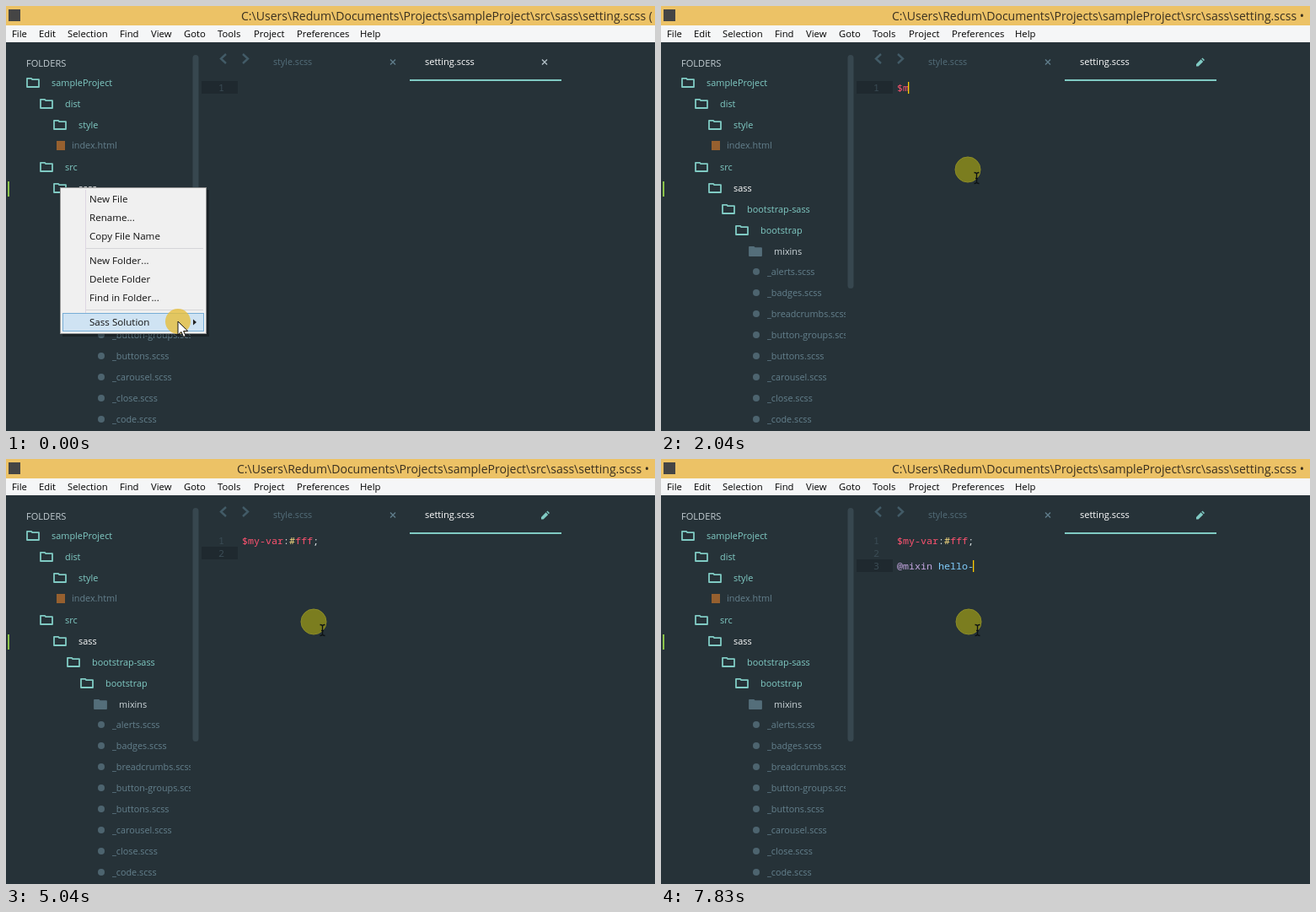
Write an HTML page that moves like this. It is 770 px wide and 504 px high and loops after 8000 ms.

```html
<!DOCTYPE html>
<html lang="en">
<head>
<meta charset="utf-8">
<title>Editor</title>
<style>
html, body { margin: 0; width: 100%; height: 100%; overflow: hidden; background: #263238; }
svg { display: block; width: 770px; height: 504px; font-family: "Open Sans", "Noto Sans", sans-serif; }
text { white-space: pre; }
.code { font: 11.67px "Noto Sans Mono", "DejaVu Sans Mono", monospace; }
</style>
</head>
<body>
<svg id="stage" viewBox="0 0 770 504">
  <clipPath id="side"><rect y="43" width="219" height="461"/></clipPath>
</svg>
<script>
const LOOP = 8000;
const TEAL = '#80cbc4', GREY = '#64808d', DIM = '#425b67';
const stage = document.getElementById('stage');

function add(tag, attrs, parent = stage, content = '') {
  const node = document.createElementNS('http://www.w3.org/2000/svg', tag);
  for (const k in attrs) node.setAttribute(k, attrs[k]);
  node.textContent = content;
  parent.append(node);
  return node;
}
const rect = (x, y, width, height, fill, parent, more) =>
  add('rect', { x, y, width, height, fill, ...more }, parent);
const label = (x, y, str, size, fill, parent) =>
  add('text', { x, y, 'font-size': size, fill }, parent, str);
const line = (d, stroke, width, parent) =>
  add('path', { d, stroke, 'stroke-width': width, fill: 'none' }, parent);
const show = (node, on) => node.setAttribute('display', on ? 'inline' : 'none');

// Window frame
rect(0, 0, 770, 23, '#ecc266');
rect(0, 23, 770, 20, '#f5f6f7');
rect(3, 4, 14, 14, '#454545');
const title = label(279, 17, '', 14.05, '#3a3020');
const bar = { File: 7, Edit: 39, Selection: 73, Find: 135, View: 172, Goto: 211,
  Tools: 251, Project: 294, Preferences: 345, Help: 420 };
for (const name in bar) label(bar[name], 37, name, 11.3, '#000');

// Sidebar
const side = add('g', { 'clip-path': 'url(#side)' });
label(24, 72, 'FOLDERS', 11.1, '#c3cdd2', side);
const folders = [['sampleProject', 0, 91], ['dist', 1, 116], ['style', 2, 141], ['src', 1, 191],
  ['sass', 2, 216], ['bootstrap-sass', 3, 241], ['bootstrap', 4, 266], ['mixins', 5, 291]];
for (const [name, depth, y] of folders) {
  const x = 24 + 16 * depth, closed = name === 'mixins';
  add('path', {
    d: `M${x + 1} ${y - 5.2}h5l1.2 1.4h7.8v8.8h-14z`, 'stroke-width': 1.8, 'stroke-linejoin': 'round',
    fill: closed ? '#546e7a' : 'none', stroke: closed ? '#546e7a' : TEAL
  }, side);
  label(x + 30, y + 4, name, 10.9, closed ? '#cfd8dc' : name === 'sass' ? '#fff' : TEAL, side);
}
rect(60, 160, 10, 11, '#96602f', side);
label(78, 169, 'index.html', 10.85, GREY, side);
['alerts', 'badges', 'breadcrumbs', 'button-groups', 'buttons', 'carousel', 'close', 'code']
  .forEach((name, i) => {
    const y = 315 + 25 * i;
    add('circle', { cx: 113, cy: y, r: 4, fill: '#4d646f' }, side);
    label(126, y + 4, `_${name}.scss`, 10.8, GREY, side);
  });
rect(2, 208, 2, 18, '#8bc34a');
rect(221.5, 58, 7, 277, '#37474f', stage, { rx: 3.5 });

// Tabs
line('M261 57l-6 5.5 6 5.5M281 57l6 5.5-6 5.5', DIM, 2.4);
label(317, 70, 'style.scss', 10.7, '#546e7a');
label(497, 70, 'setting.scss', 11, '#fff');
const cross = x => `M${x - 3} 63.5l6 6m0-6l-6 6`;
line(cross(459), '#607d8b', 1.4);
const close = line(cross(639), '#b0bec5', 1.4);
const pencil = add('path', { d: 'M635 71.5v-2.6l5.6-5.6 2.6 2.6-5.6 5.6zM641.3 62.6l1.2-1.1 2.5 2.5-1.1 1.2z', fill: TEAL });
rect(479, 87, 180, 2, TEAL);

// Editor
const gutter = rect(232, 89, 43, 15, '#1f292f');
const rows = [0, 1, 2].map(i => ({
  num: add('text', { x: 252, y: 101 + 15 * i, class: 'code', fill: '#3b4c55' }, stage, i + 1),
  code: add('text', { x: 280, y: 101 + 15 * i, class: 'code' })
}));
const caret = rect(279, 90, 1.3, 14, '#ffcc00');

// Context menus
function popup(x, y, w, h, items, gap) {
  const g = add('g', {});
  rect(x + 3, y + 3, w, h, '#000', g, { opacity: .3 });
  rect(x + .5, y + .5, w - 1, h - 1, '#f0f0f0', g, { stroke: '#979797' });
  line(`M${x + 30.5} ${y + 3}v${h - 6}`, '#ddd6e2', 1, g);
  for (const [name, dy, hot] of items) {
    if (hot) rect(x + 3.5, y + dy - 10.5, w - 7, 21, '#cfe3f3', g, { stroke: '#78aed6' });
    if (name) label(x + gap, y + dy + 4, name, 11.6, '#111', g);
    else line(`M${x + 31} ${y + dy - .5}h${w - 35}`, '#d5d5d8', 1, g);
  }
  return g;
}
const menu = popup(64, 215, 174, 174, [['New File', 14], ['Rename...', 36], ['Copy File Name', 58], ['', 73],
  ['New Folder...', 87], ['Delete Folder', 109], ['Find in Folder...', 131], ['', 146],
  ['Sass Solution', 160, true]], 35);
add('path', { d: 'M222 371.5l4 3.5-4 3.5z', fill: '#222' }, menu);
const submenu = popup(232, 361, 245, 72, [['Add To AutoComplete', 14, true],
  ['Remove From AutoComplete', 36], ['Clear AutoComplete', 58]], 35);

// Pointer
const pointer = add('g', {});
const halo = add('circle', { r: 15 }, pointer);
const arrow = add('path', { d: 'M0 0v16l4-3.6 2.6 6 2.6-1.1-2.6-5.8h5.2z', fill: '#fff', stroke: '#111' }, pointer);
const beam = line('M7.5 3.5q3 0 3 2v9q0 2-3 2M13.5 3.5q-3 0-3 2v9q0 2 3 2M9 10.5h3', '#0c1114', 1.3, pointer);

const SUB_OPEN = 300, MENU_CLOSE = 860;
const path = [[0, 204, 374], [60, 204, 374], [320, 232, 374], [430, 232, 374], [760, 330, 377],
  [860, 332, 376], [1090, 364, 194], [4450, 364, 194], [4510, 365, 193], [LOOP, 365, 193]];

function pointerAt(t) {
  const i = path.findIndex(p => p[0] > t);
  const [t0, x0, y0] = path[i - 1], [t1, x1, y1] = path[i];
  const u = (t - t0) / (t1 - t0), e = u * u * (3 - 2 * u);
  return [x0 + (x1 - x0) * e, y0 + (y1 - y0) * e];
}

// Typing: one time per character
const typed = '$my-var:#fff;\n\n@mixin hello-';
const times = [1890, 2040, 2130, 2270, 2400, 2480, 2560, 2660, 3410, 3760, 3890, 4020, 4380, 4590,
  5360, 5900, 6020, 6090, 6180, 6260, 6350, 6890, 7020, 7140, 7270, 7350, 7480, 7770];
const syntax = /(\$[\w-]*|f+)|(#(?=f))|(@mixin(?= ))|((?<= )[\w-]+)|(.)/g;
const inks = ['#ff5370', '#ffe082', '#c3a6e0', '#82cfff', '#dfe6e9'];
const paint = str => str.replace(syntax, (token, ...groups) =>
  `<tspan fill="${inks[groups.slice(0, 5).findIndex(g => g !== undefined)]}">${token}</tspan>`);

// Caret: on, fade out, off, fade in
function blink(age) {
  const a = ((age % 880) + 880) % 880;
  if (a < 260) return 1;
  if (a < 440) return (440 - a) / 180;
  return a < 700 ? 0 : (a - 700) / 180;
}

function draw(now) {
  const t = now % LOOP;
  const count = times.filter(k => k <= t).length;
  const lines = typed.slice(0, count).split('\n');
  const last = lines.length - 1;
  rows.forEach(({ num, code }, i) => {
    show(num, i <= last);
    const html = paint(lines[i] || '');
    if (code.dataset.html !== html) code.innerHTML = code.dataset.html = html;
  });
  gutter.setAttribute('y', 89 + 15 * last);
  caret.setAttribute('x', 279 + 7 * lines[last].length);
  caret.setAttribute('y', 90 + 15 * last);
  caret.setAttribute('opacity', blink(t - (count ? times[count - 1] : 310)));

  const dirty = count > 0;
  title.textContent = 'C:\\Users\\Redum\\Documents\\Projects\\sampleProject\\src\\sass\\setting.scss ' + (dirty ? '•' : '(');
  title.setAttribute('x', dirty ? 274 : 279);
  show(close, !dirty);
  show(pencil, dirty);

  const open = t < MENU_CLOSE;
  show(menu, open);
  show(submenu, open && t >= SUB_OPEN);
  show(arrow, open);
  show(beam, !open);
  halo.setAttribute('fill', open ? 'rgba(230,190,60,.8)' : '#7b7d1f');
  halo.setAttribute('stroke', open ? 'none' : '#8c8c27');
  pointer.setAttribute('transform', `translate(${pointerAt(t)})`);
  requestAnimationFrame(draw);
}
draw(0);
</script>
</body>
</html>
```
